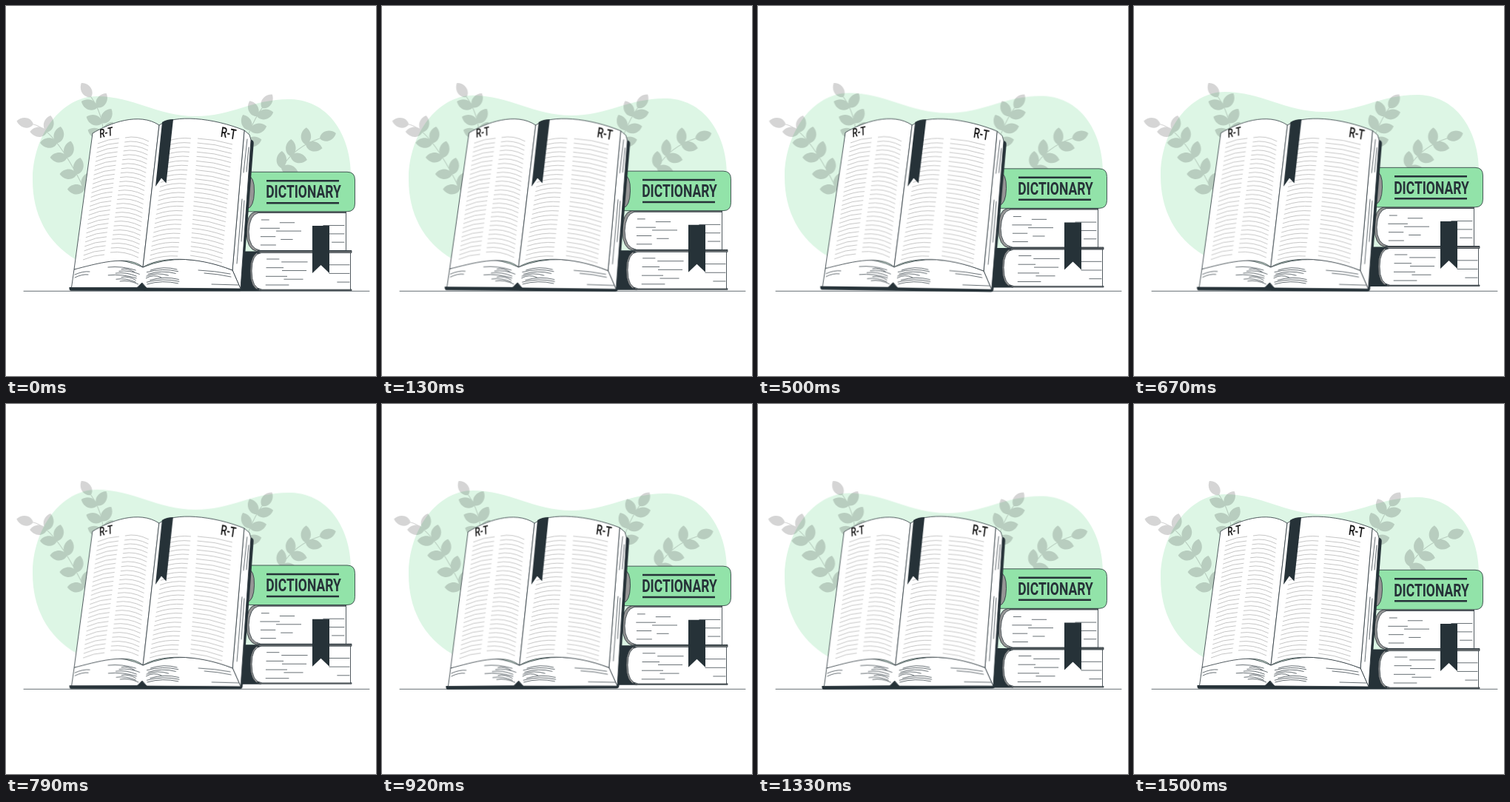
An HTML page that plays this animation: 500x500 px, repeating every 1540 ms.

```html
<!DOCTYPE html>
<html lang="en">
<head>
<meta charset="utf-8">
<title>Dictionary</title>
<style>
  html, body { margin: 0; width: 100%; height: 100%; overflow: hidden; background: #fff; }
  svg { display: block; width: 100%; height: 100%; }
  .ink { fill: #263238; }
  .page { fill: #fff; stroke: #263238; stroke-width: .8; stroke-linejoin: round; }
  .line { fill: none; stroke: #263238; stroke-width: .7; stroke-linecap: round; }
  .print { fill: none; stroke: #b2b2b2; stroke-width: .75; }
  .gray { fill: #969696; stroke: #263238; stroke-width: .8; }
  .title { font: 700 24.5px Roboto, sans-serif; text-anchor: middle; }
  .head { font: 500 18px Roboto, sans-serif; fill: #111; }
  .float { animation: float 1540ms linear infinite; }
  .wind { animation: wind 1540ms linear infinite; transform-origin: 210px 268px; }
  .shake { animation: shake 1540ms ease infinite; }
  /* each move takes 1500 ms, then rests for 40 ms */
  @keyframes float {
    0%, 97.4%, 100% { transform: translateY(0); }
    48.7% { transform: translateY(-6.67px); }
  }
  @keyframes wind {
    0%, 97.4%, 100% { transform: rotate(0deg); }
    24.35% { transform: rotate(1deg); }
    73.05% { transform: rotate(-1deg); }
  }
  @keyframes shake {
    0%, 97.4%, 100% { transform: translateX(0); }
    9.74%, 87.66% { transform: translateX(-.67px); }
    19.48%, 77.92% { transform: translateX(1.33px); }
    29.22%, 48.7%, 68.18% { transform: translateX(-2.5px); }
    38.96%, 58.44% { transform: translateX(2.5px); }
  }
</style>
</head>
<body>
<svg viewBox="0 0 500 500">
  <path class="float" fill="#ddf6e5" d="M36 236C36 174 75 122 123 122C172 122 205 149 256 149C305 149 335 125 385 126C440 128 466 180 466 228C466 280 420 330 330 345C250 360 160 372 95 343C55 320 36 280 36 236Z"/>

  <g class="shake" opacity=".165">
    <path id="leaves"/>
    <path id="stems" fill="none" stroke="#000" stroke-width="1.2"/>
  </g>

  <path class="line" d="M24 385.3H491"/>

  <g class="float">
    <path class="ink" d="M300 331.5H345V385H300Z"/>
    <path class="gray" d="M467 331.5H344Q330 334 330 358Q330 382 343 384.500H467V383H340V333.500H467Z"/>
    <path class="page" d="M465.500 333.500H345Q332 335 332 358Q332 382 346 383.200H465.500Z"/>
    <path class="gray" d="M459.500 278H337Q325 280 325 305Q325 329 339 331.500H467V330.500H340V279.500H459.500Z"/>
    <path class="page" d="M459.500 279.500H341Q329 282 328 305Q328 328 344 330.500H459.500Z"/>
    <path id="grain" class="line"/>
    <path class="ink" d="M414 297H437V361L425.500 350L414 361Z"/>
    <path fill="#92e3a9" stroke="#263238" stroke-width=".8" d="M322 224.300H461Q471.500 224.300 471.500 235V267Q471.500 277.800 461 277.800H322Z"/>
    <path class="gray" d="M326 229Q336 230 335.500 251Q335 272 326 274Z"/>
    <path class="ink" d="M352 235H450V237.500H352ZM352 265H450V267.500H352Z"/>
    <text class="ink title" transform="translate(402 259.500) scale(.715 1)">DICTIONARY</text>
  </g>

  <g class="wind">
    <path class="ink" d="M326 179L332 181Q335 182 334.700 186L319.500 382Q319 385.300 316 385.300L88 384.800Q85 384.500 85.500 380H316Z"/>
    <path class="page" d="M322 168L329 174L331 181L317 382L306 357Z"/>
    <path class="page" d="M92 356L88.500 380.500H177L184 374L190 381L317 382L306 357Q240 330 185 353Q140 332 92 356Z"/>
    <path class="page" d="M117 172C140 158 180 143 207 161L185 353C165 335 120 349 92 356Z"/>
    <path class="page" d="M207 161C228 146 280 151 322 168L306 357C255 337 207 339 185 353Z"/>
    <path id="print" class="print"/>
    <path id="fan" class="line"/>
    <path class="line" d="M93 363Q104 358 113 359M93 367Q103 362 111 363M260 357Q282 358 303 362M268 361Q286 362 304 366M278 376L314 377"/>
    <path class="line" d="M326 180L321 225M328 191L325 224M319 261L312 348M322 263L318 318"/>
    <path class="ink" d="M177 381L183.500 374L190 381Z"/>
    <path class="ink" d="M211 157Q217 153 226 153L216.500 239.500L210 232.500L202 244Z"/>
    <text class="head" transform="translate(126.500 178.500) rotate(-12) skewX(-10) scale(.66 .9)">R-T</text>
    <text class="head" transform="translate(289.500 176.500) rotate(11) skewX(3) scale(.75 1.06)">R-T</text>
  </g>
</svg>
<script>
  const set = (id, d) => document.getElementById(id).setAttribute('d', d);
  const mix = (a, b, t) => a + (b - a) * t;
  const range = (n, f) => Array.from({ length: n }, (_, i) => f(i)).join('');
  let seed = 71;
  const rand = () => (seed = seed * 16807 % 2147483647) / 2147483647;

  // a leaf growing from its base in direction a
  const leaf = (x, y, a) => {
    const at = (u, v) => `${x + u * Math.cos(a) - v * Math.sin(a)} ${y + u * Math.sin(a) + v * Math.cos(a)} `;
    return `M${at(0, 0)}C${at(4, -9)}${at(17, -9)}${at(23, 0)}C${at(17, 9)}${at(4, 9)}${at(0, 0)}Z`;
  };

  // one leaf at the tip, then pairs down a quadratic stem
  const plant = ([x0, y0], [x1, y1], [x2, y2], pairs) => {
    const up = Math.atan2(y0 - y2, x0 - x2), spread = .88;
    const bend = (a, b, c, t) => mix(mix(a, b, t), mix(b, c, t), t);
    return leaf(x0, y0, Math.atan2(y0 - y1, x0 - x1)) + range(pairs, i => {
      const t = 1 - .7 * (1 - i / (pairs - 1)) ** 1.2;
      const x = bend(x0, x1, x2, t), y = bend(y0, y1, y2, t);
      return leaf(x, y, up - spread) + leaf(x, y, up + spread);
    });
  };
  const plants = [
    [[115, 123], [131, 146], [132, 176], 3],
    [[37, 160], [66, 166], [106, 248], 5],
    [[346, 138], [334, 154], [323, 186], 3],
    [[424, 179], [390, 190], [372, 219], 3]
  ];
  set('leaves', plants.map(p => plant(...p)).join(''));
  set('stems', plants.map(([a, b, c]) => `M${a}Q${b} ${c}`).join(''));

  // short strokes on a closed page block, by turns left, middle and right
  const grain = (left, right, top, bottom) => range(10, i => {
    const w = mix(10, 38, rand()), x = mix(left, right - w, [.1, .35, 1][i % 3]);
    return `M${x} ${mix(top, bottom, i / 9)}h${w}`;
  });
  set('grain', grain(334, 457, 289, 323) + grain(342, 464, 342, 377));

  // strokes that fan out from the spine
  set('fan', [-1, 1].map(side => range(8, i => {
    const x = 184 + side * (3 + 9 * rand()), y = 357 + i * 2.7, w = side * mix(16, 44, rand());
    return `M${x} ${y}q${w * .5} -6 ${w} ${side > 0 ? -1 : -4}`;
  })).join(''));

  // a column of curved rows between its top and bottom row
  const rows = 27;
  const column = (top, bottom, arch) => range(rows, i => {
    const [x1, y1, x2, y2] = top.map((v, k) => mix(v, bottom[k], i / (rows - 1)));
    return `M${x1} ${y1}Q${(x1 + x2) / 2} ${(y1 + y2) / 2 - arch} ${x2} ${y2}`;
  });
  set('print',
    column([124, 186, 153, 179], [104, 343, 133, 336], 3) +
    column([161, 178, 193, 183], [141, 333, 179, 340], 6) +
    column([217, 183, 250, 179], [194, 343, 232, 338], 4) +
    column([259, 179, 306, 187], [249, 337, 292, 347], 3));
</script>
</body>
</html>
```
